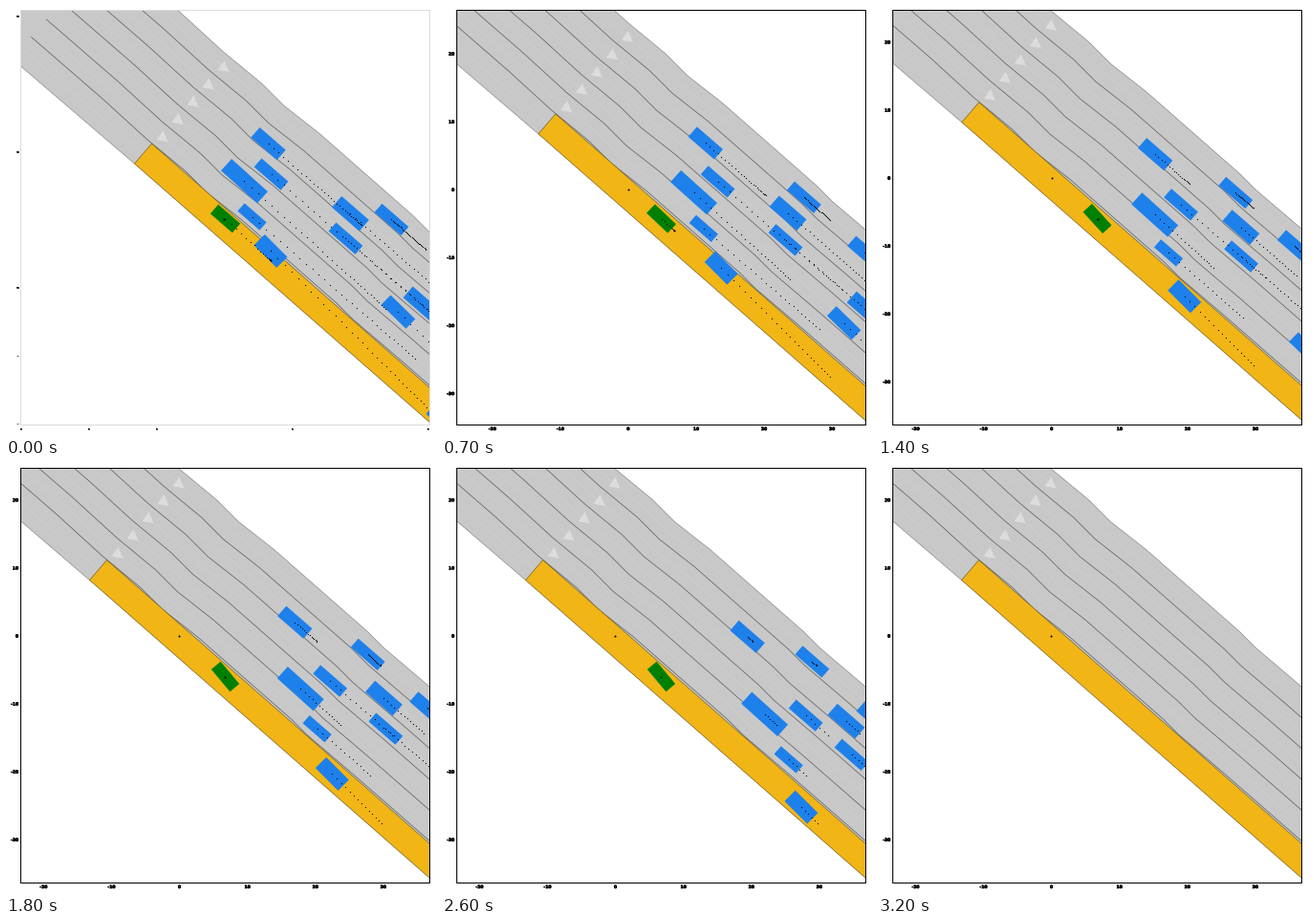
Animation, 450 px wide and 450 px high, one loop 3600 ms. Source, as a matplotlib script:

```python
import numpy as np
import matplotlib.pyplot as plt
from matplotlib.animation import FuncAnimation
from matplotlib.patches import Polygon
from matplotlib.patheffects import withStroke

# World units are pixels, y down, in the view once the green car has stopped.
LAST = 31                      # last step with traffic
BRAKE = 15                     # step at which the green car stands still
STEPS = np.arange(LAST + 1)
ORIGIN = np.array([182, 179])
EGO = np.array([230, 222])
CROSS = np.array([-16, 18.3])  # from one lane border to the next
SLOPE = 0.87
LANE = CROSS[1] - SLOPE * CROSS[0]
TICK = 71.1

BLUE, GREEN, AMBER, ROAD = "#1e80eb", "#008000", "#f2b516", "#c8c8c8"
FAINT, ARROW = "#d2d2d2", "#dcdcdc"

SMALL, SLIM, SEDAN = (30.5, 11), (37, 12), (36, 14)
WIDE, VAN, TRUCK = (38, 15.5), (33.5, 16), (51, 16.5)

fig = plt.figure(figsize=(6.25, 6.25), dpi=72, facecolor="white")
ax = fig.add_axes([15 / 450, 12 / 450, 428 / 450, 434 / 450])
ax.tick_params(length=0, pad=2, labelsize=4.5)


def road_y(x, lane):
    """Height of a (fractional) lane border, counted from the top edge."""
    return 5 + SLOPE * (x - 182) + LANE * lane


def rest(i):
    return np.maximum(0, 1 - np.asarray(i) / BRAKE)


def camera(i):
    """Distance still to go while the green car brakes to a stop."""
    return np.multiply.outer(rest(i) ** 2, [47, 43.5])


def box(center, size, angle):
    u = np.array([np.cos(angle), np.sin(angle)]) * size[0] / 2
    v = np.array([-np.sin(angle), np.cos(angle)]) * size[1] / 2
    return center + np.array([u + v, u - v, -u - v, -u + v])


def line(points, color="#5a5a5a", width=0.7):
    ax.plot(*np.transpose(points), color=color, lw=width, zorder=1.2)


def fill(points, color, z, **kw):
    return ax.add_patch(Polygon(points, fc=color, zorder=z, **kw))


class Car:
    def __init__(self, track, angles, size, color):
        self.track, self.angles, self.size = track, angles, size
        self.body = fill(np.zeros((4, 2)), color, 1.6, lw=0)
        self.trail, = ax.plot([], [], "o", color="black", ms=1.2, mew=0,
                              zorder=2)

    def show(self, i):
        visible = i <= LAST
        self.body.set_visible(visible)
        self.trail.set_visible(visible)
        if visible:
            self.body.set_xy(box(self.track[i], self.size, self.angles[i]))
            self.trail.set_data(*self.track[i:].T)


def drive(x, lane, run, slow, size, drift=0):
    """Car going `run` px to the right, slowing down, drifting over lanes."""
    u = STEPS / LAST
    u = u * (1 + slow * (1 - u))
    xs = x + run * u
    angle = np.arctan(SLOPE + drift * LANE / run)
    track = np.stack([xs, road_y(xs, lane + drift * u)], axis=-1)
    return Car(track, np.full(len(STEPS), angle), size, BLUE)


def draw_road():
    top = np.array([(60, -103), (135, -38), (181, 4), (221, 37), (244, 60),
                    (281, 89), (379, 175), (396, 192), (443, 232),
                    (600, 369)])
    start, corner = (88, 121), (106, 100)
    low_end, bay_end = (460, 447), (460, 411)
    low = [(-100, -39), (-31, 19), start]
    fill([*top, low_end, *low[::-1]], ROAD, 1)
    line(top, "#8c8c8c")
    line(low, "#8c8c8c")
    for k in range(5):
        line(top + CROSS * (k + 0.5), FAINT, 0.6)
        line(top + CROSS * (k + 1))
        fill((181, 19) + CROSS * k + [(1, -6), (-6, 4), (6, 6)], ARROW, 1.3)
    line([(-100, -60), (97, 110)], FAINT, 0.6)
    fill([corner, start, low_end, bay_end], AMBER, 1.25, ec="#6b5a20", lw=0.6)
    ax.plot(*ORIGIN, "o", color="black", ms=2, mew=0, zorder=2)


def label_axes(first):
    ks = np.arange(-5, 6)
    names = [str(10 * k) for k in ks]
    style = dict(weight="bold",
                 path_effects=[withStroke(linewidth=0.6, foreground="black")])
    if first:
        names = ["" if k in (0, 2) else "-" for k in ks]
    ax.set_xticks(ORIGIN[0] + TICK * ks, names, **style)
    ax.set_yticks(ORIGIN[1] - TICK * ks, names, **style)
    ax.spines[:].set(color=ARROW if first else "black", linewidth=1)


draw_road()
cars = [
    drive(228, 1.71, 98, 0.75, SEDAN),
    drive(231, 2.62, 174, 0.18, SLIM),
    drive(203, 3.60, 148, 0.55, TRUCK, drift=0.15),
    drive(211, 4.54, 171, 0.38, SMALL),
    drive(230.5, 5.13, 163, 0.42, VAN, drift=0.66),
    drive(314, 1.66, 124, 0.33, WIDE),
    drive(357, 0.69, 36, 0.15, SLIM),
    drive(309, 2.60, 137, 0.28, SLIM),
    drive(364, 3.50, 168, 0.20, SEDAN, drift=0.55),
    drive(388.5, 2.58, 160, 0.20, WIDE),
    drive(424.5, 0.76, 36, -0.50, SEDAN),
    drive(418, 1.45, 140, 0, WIDE),
    drive(411, 5.70, 165, 0, VAN),
    Car(EGO - camera(STEPS), np.radians(50 - 9 * np.sqrt(rest(STEPS))),
        (30.5, 12.8), GREEN),
]


def update(frame):
    i = min(frame, LAST + 1)
    label_axes(i == 0)
    dx, dy = camera(i)
    ax.set_xlim(15.5 - dx, 443.5 - dx)
    ax.set_ylim(437.5 - dy, 3.5 - dy)
    for car in cars:
        car.show(i)
    return []


anim = FuncAnimation(fig, update, frames=36, interval=100,
                     repeat=True, repeat_delay=0, blit=False)
plt.show()
```
